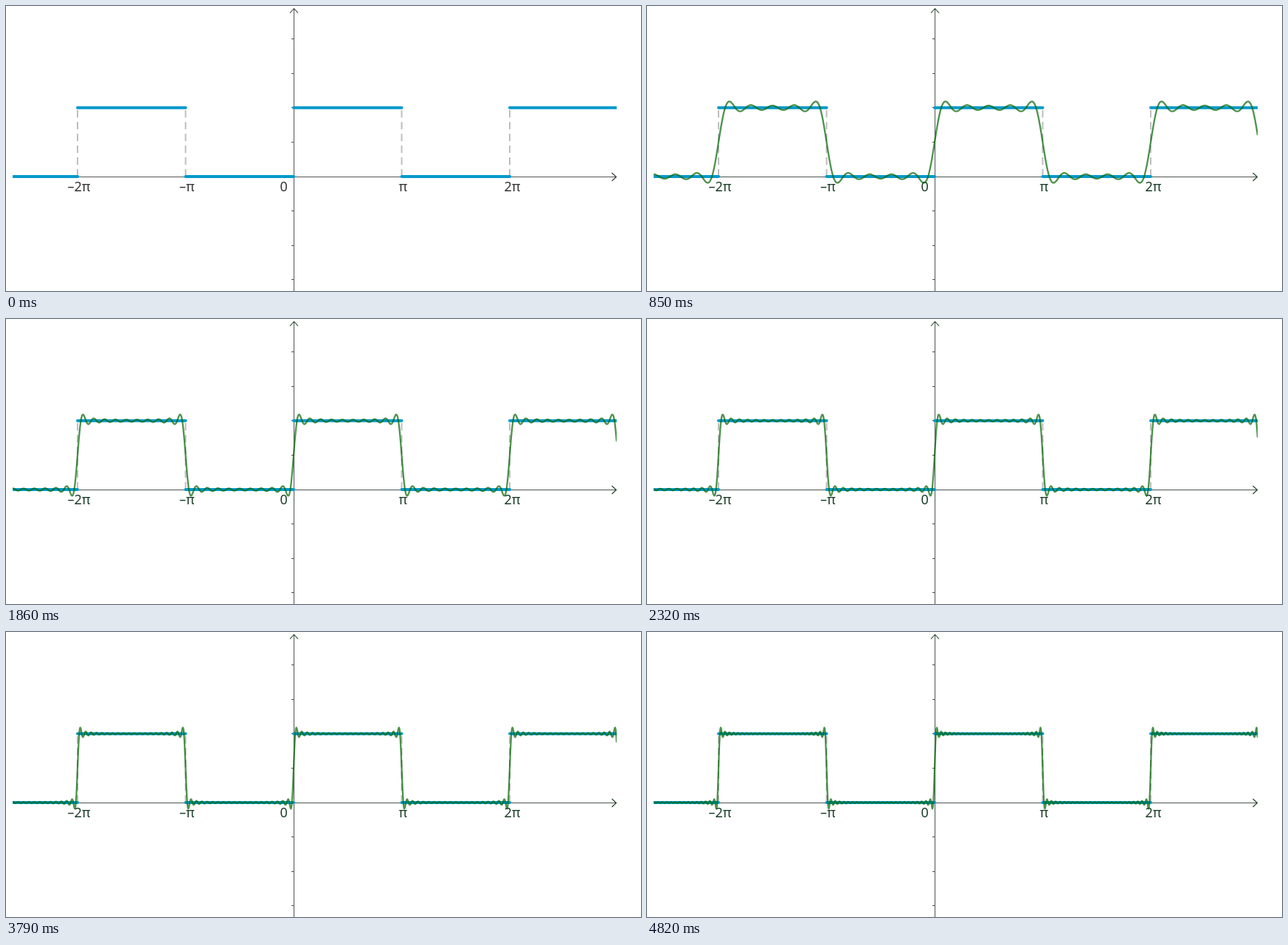
An HTML page for the animation above (5350 ms loop, 861 by 386 pixels).

```html
<!DOCTYPE html>
<html lang="en">
<head>
<meta charset="utf-8">
<title>Square wave partial sums</title>
<style>
  html, body { margin: 0; width: 100%; height: 100%; overflow: hidden; background: #fff; }
  svg { display: block; width: 861px; height: 386px; }
  path { fill: none; }
  text { font: 18px "Noto Sans", "Open Sans", sans-serif; }
  .plain { --axis: #555; --ink: #333; }
  .tinted { --axis: #4c564f; --ink: #1a3d27; }
  #axes { stroke: var(--axis); stroke-width: 1; }
  #arrows { stroke: var(--ink); stroke-width: 1.1; }
  #labels { fill: var(--ink); }
  #jumps { stroke: #bebebe; stroke-width: 2; stroke-dasharray: 10 6; }
  #steps { stroke: #0099cc; stroke-width: 4; stroke-linecap: round; }
  #sum { stroke: #006400; stroke-opacity: .7; stroke-width: 2.3; stroke-linejoin: round; }
</style>
</head>
<body>
<svg id="stage" class="plain" viewBox="0 0 861 386">
  <clipPath id="view"><rect x="9" y="0" width="819" height="386"/></clipPath>
  <path id="axes"/>
  <path id="arrows" d="M385 9.5L390.5 3.5L396 9.5M821.5 226L827.5 231.5L821.5 237"/>
  <g clip-path="url(#view)">
    <path id="jumps"/>
    <path id="steps"/>
  </g>
  <g id="labels">
    <text x="83.5" y="251">–2π</text>
    <text x="235" y="251">–π</text>
    <text x="371.5" y="251">0</text>
    <text x="532.5" y="251">π</text>
    <text x="675.5" y="251">2π</text>
  </g>
  <g clip-path="url(#view)"><path id="sum"/></g>
</svg>
<script>
const LOOP = 5350;
const X0 = 390, Y0 = 231, HALF = 146.5, UNIT = 46.6;
const LEFT = 9, RIGHT = 828, HIGH = Y0 - 2 * UNIT;
const STARTS = [300, 850, 1310, 1860, 2320, 2870, 3330, 3790, 4340, 4820];

const el = id => document.getElementById(id);
const draw = (id, d) => el(id).setAttribute("d", d);

function drawGraph() {
  let axes = `M${LEFT} 231.5H827M390.5 386V4`;
  for (let k = -3; k <= 4; k++) {
    if (k) axes += `M387 ${Math.floor(Y0 - k * UNIT) + .5}H390`;
  }
  draw("axes", axes);

  let steps = "", jumps = "";
  for (let k = -3; k < 3; k++) {
    const x = X0 + k * HALF;
    steps += `M${x} ${k % 2 ? Y0 : HIGH}h${HALF}`;
    if (k && k > -3) jumps += `M${x} ${Y0}V${HIGH}`;
  }
  draw("steps", steps);
  draw("jumps", jumps);
}

// Fourier sum with the first n odd harmonics
function partialSum(x, n) {
  const angle = (x - X0) / HALF * Math.PI;
  let s = 0;
  for (let k = 1; k < 2 * n; k += 2) s += Math.sin(k * angle) / k;
  return .5 + 2 / Math.PI * s;
}

function curve(n) {
  const points = [];
  for (let x = LEFT - 1; x <= RIGHT; x += .5) {
    points.push(x + " " + (Y0 - 2 * UNIT * partialSum(x, n)).toFixed(2));
  }
  return "M" + points.join("L");
}

let shown = -1;
function render(time) {
  const stage = STARTS.filter(t => t <= time).length;
  if (stage === shown) return;
  shown = stage;
  el("stage").setAttribute("class", stage ? "tinted" : "plain");
  draw("sum", stage ? curve(Math.round(2.5 * stage)) : "");
}

drawGraph();
render(0);
const begin = performance.now();
function tick() {
  render((performance.now() - begin) % LOOP);
  requestAnimationFrame(tick);
}
requestAnimationFrame(tick);
</script>
</body>
</html>
```
